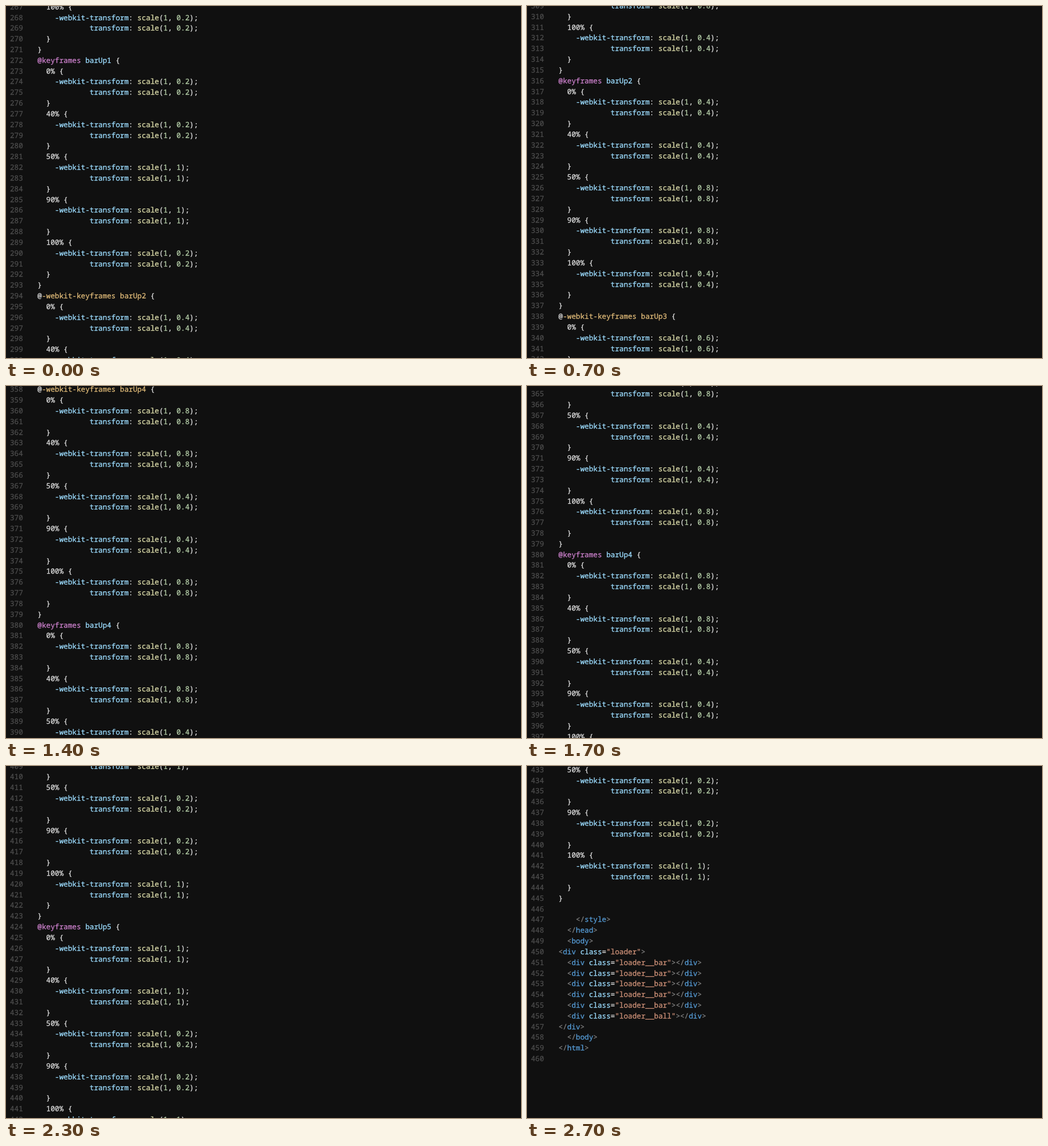
Animation, 904 px wide and 619 px high, one loop 2.8 s. Source, as an HTML page:

```html
<!DOCTYPE html>
<html lang="en">
<head>
<meta charset="utf-8">
<title>Scrolling code</title>
<style>
  html, body { margin: 0; width: 100%; height: 100%; overflow: hidden; background: #101010; }
  svg { display: block; width: 904px; height: 619px; }
  text {
    font: 12.717px "Noto Sans Mono", monospace;
    font-variant-ligatures: none;
    text-rendering: geometricPrecision;
    white-space: pre;
  }
  text, tspan { fill: currentColor; stroke: currentColor; stroke-width: 0.3px; }
  .plain { color: #dcdcdc; }
  .prop { color: #9cdcfe; }
  .func { color: #dcdcaa; }
  .num { color: #b5cea8; }
  .at { color: #cc80cc; }
  .gold { color: #dfba78; }
  .tag { color: #569cd6; }
  .edge { color: #808080; }
  .str { color: #ce9178; }
  .line { color: #4c4c4c; }
</style>
</head>
<body>
<svg id="stage" viewBox="0 0 904 619"></svg>
<script>
const NS = 'http://www.w3.org/2000/svg';
const LOOP = 2800, SLOT = 100;
const PITCH = 18.83, WHEEL = 99.07;
const FIRST = 250, TOP_LINE = 268, TOP_BASE = 24.5;

// Scroll path: time in ms, distance in wheel steps
const PATH = [[0, 0], [400, 3], [700, 8], [1200, 15], [1600, 19.5], [1700, 18.5], [2300, 27], [2700, 31.5]];
// Slots in which the picture stands still
const HELD = new Set([2, 3, 6, 8, 11, 13, 15, 20, 22]);

const lines = [];
// Takes alternating class names and strings
const add = (...parts) => lines.push(parts);

function declaration(indent, name, value) {
  add('prop', ' '.repeat(indent) + name, 'plain', ': ', 'func', 'scale', 'plain', '(',
      'num', '1', 'plain', ', ', 'num', String(value), 'plain', ');');
}

function keyframes(n, rest, peak, prefixed) {
  if (prefixed) add('plain', '@', 'gold', `-webkit-keyframes barUp${n}`, 'plain', ' {');
  else add('at', '@keyframes', 'prop', ` barUp${n}`, 'plain', ' {');
  const stops = rest === peak ? [0, 100] : [0, 40, 50, 90, 100];
  for (const stop of stops) {
    const value = stop === 50 || stop === 90 ? peak : rest;
    add('plain', `  ${stop}% {`);
    declaration(4, '-webkit-transform', value);
    declaration(12, 'transform', value);
    add('plain', '  }');
  }
  add('plain', '}');
}

const tag = (indent, open, name) => add('edge', ' '.repeat(indent) + open, 'tag', name, 'edge', '>');
const openDiv = (indent, cls) => ['edge', ' '.repeat(indent) + '<', 'tag', 'div', 'prop', ' class',
  'plain', '=', 'str', `"${cls}"`, 'edge', '>'];
const fullDiv = cls => add(...openDiv(2, cls), 'edge', '</', 'tag', 'div', 'edge', '>');

for (let n = 1; n <= 5; n++) {
  const rest = n / 5, peak = (6 - n) / 5;
  keyframes(n, rest, peak, true);
  keyframes(n, rest, peak, false);
}
add();
tag(4, '</', 'style');
tag(2, '</', 'head');
tag(2, '<', 'body');
add(...openDiv(0, 'loader'));
for (let i = 0; i < 5; i++) fullDiv('loader__bar');
fullDiv('loader__ball');
tag(0, '</', 'div');
tag(2, '</', 'body');
tag(0, '</', 'html');
add();

const stage = document.getElementById('stage');

function make(name, parent, attrs, content = '') {
  const el = document.createElementNS(NS, name);
  for (const key in attrs) el.setAttribute(key, attrs[key]);
  el.textContent = content;
  return parent.appendChild(el);
}

const rows = lines.map((parts, i) => {
  const row = make('g', stage, {});
  make('text', row, { x: 7, class: 'line' }, String(FIRST + i));
  const code = make('text', row, { x: 55.3 });
  for (let k = 0; k < parts.length; k += 2) {
    make('tspan', code, { class: parts[k] }, parts[k + 1]);
  }
  return row;
});

function scrollAt(time) {
  let slot = Math.floor(time / SLOT);
  while (HELD.has(slot)) slot--;
  const t = slot * SLOT;
  const next = Math.max(1, PATH.findIndex(point => point[0] >= t));
  const [t0, s0] = PATH[next - 1], [t1, s1] = PATH[next];
  return WHEEL * (s0 + (s1 - s0) * (t - t0) / (t1 - t0));
}

let shown = -1;
function draw(time) {
  const scroll = scrollAt(time % LOOP);
  if (scroll === shown) return;
  shown = scroll;
  rows.forEach((row, i) => {
    const y = Math.round(TOP_BASE + (FIRST + i - TOP_LINE) * PITCH - scroll);
    row.setAttribute('transform', `translate(0 ${y})`);
    row.setAttribute('display', y > -6 && y < 634 ? 'inline' : 'none');
  });
}

const start = performance.now();
function tick() {
  draw(performance.now() - start);
  requestAnimationFrame(tick);
}
tick();
</script>
</body>
</html>
```
